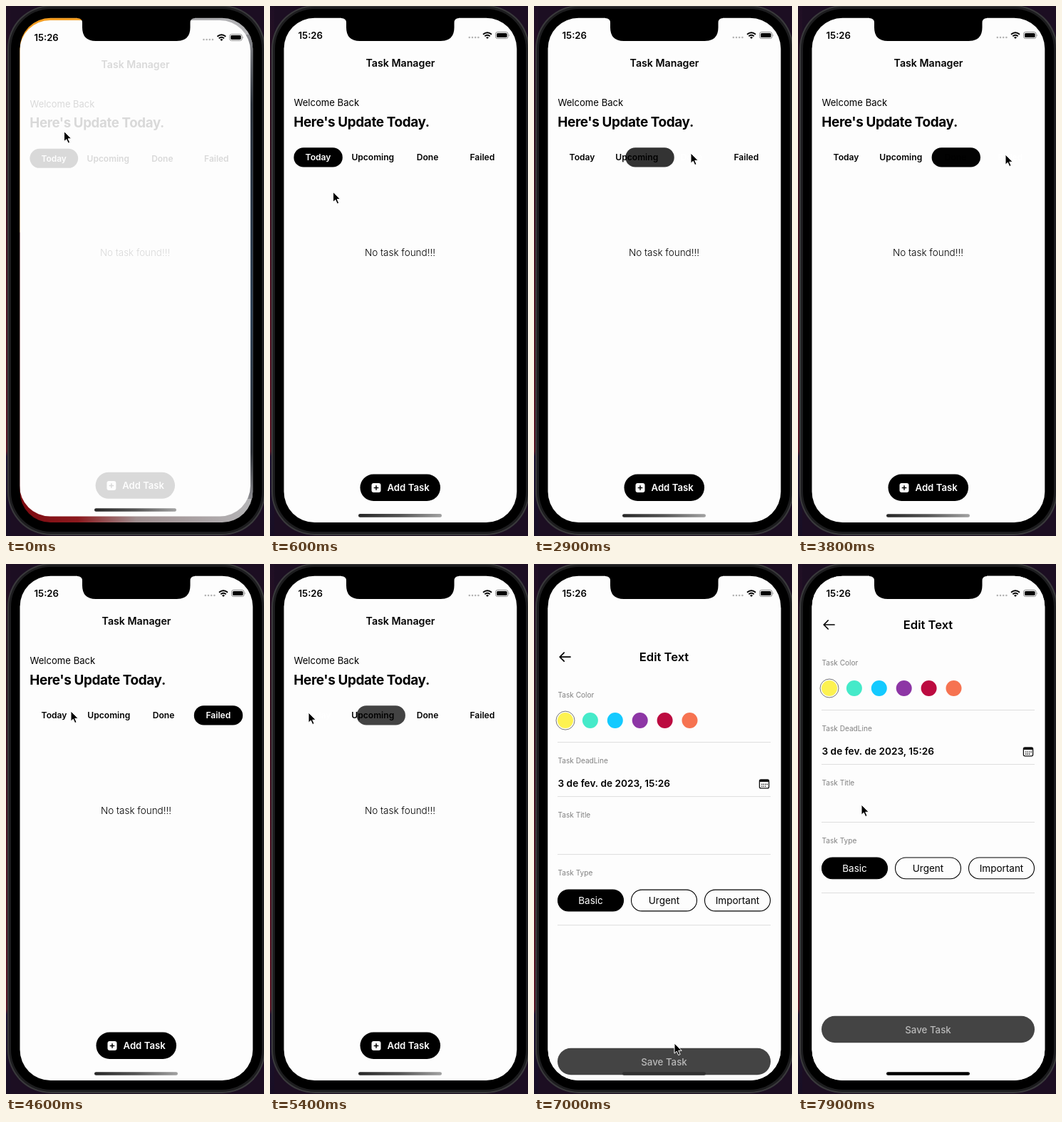
An HTML page for the animation above (8 s loop, 362x742 px).

```html
<!DOCTYPE html>
<html lang="en">
<head>
<meta charset="utf-8">
<title>Task app</title>
<style>
  html, body { margin: 0; width: 100%; height: 100%; overflow: hidden; background: #1c0e22; }
  svg { display: block; width: 100%; height: 100%; }
  text { font-family: Inter, "Open Sans", sans-serif; fill: #000; }
  .mid { text-anchor: middle; }
  .semi { font-weight: 600; }
  .light { font-weight: 300; }
  .tab { font-size: 12.1px; font-weight: 600; text-anchor: middle; }
  .label { font-size: 10.1px; fill: #808080; }
  .type { font-size: 13.5px; text-anchor: middle; }
  .line { stroke: #dedede; stroke-width: 1; }
</style>
</head>
<body>
<svg viewBox="0 0 362 742" preserveAspectRatio="xMidYMid meet">
  <defs>
    <linearGradient id="side" x2="0" y2="1">
      <stop offset="0" stop-color="#1f0f25"/>
      <stop offset=".2" stop-color="#2c101f"/>
      <stop offset=".55" stop-color="#4c1424"/>
      <stop offset=".84" stop-color="#581625"/>
      <stop offset=".85" stop-color="#1d1230"/>
      <stop offset="1" stop-color="#180e24"/>
    </linearGradient>
    <linearGradient id="wallTop">
      <stop offset="0" stop-color="#f39a1b"/>
      <stop offset=".3" stop-color="#f5a22a"/>
      <stop offset=".6" stop-color="#a5a5a8"/>
      <stop offset="1" stop-color="#b5b5b8"/>
    </linearGradient>
    <linearGradient id="wallLow">
      <stop offset="0" stop-color="#7d0a10"/>
      <stop offset=".25" stop-color="#8c1a1e"/>
      <stop offset=".5" stop-color="#a08f90"/>
      <stop offset="1" stop-color="#b4b4b6"/>
    </linearGradient>
    <linearGradient id="wallRight" x2="0" y2="1">
      <stop offset="0" stop-color="#8c8c90"/>
      <stop offset=".15" stop-color="#2c333d"/>
      <stop offset=".6" stop-color="#2f4257"/>
      <stop offset=".9" stop-color="#30343b"/>
      <stop offset="1" stop-color="#8c8c90"/>
    </linearGradient>
    <linearGradient id="barFade">
      <stop offset="0" stop-color="#262626"/>
      <stop offset=".5" stop-color="#555"/>
      <stop offset="1" stop-color="#a2a2a2"/>
    </linearGradient>
    <clipPath id="screen"><rect x="19.5" y="16.7" width="326.8" height="706.3" rx="43"/></clipPath>
    <clipPath id="winClip"><rect id="winShape" rx="43"/></clipPath>
  </defs>

  <!-- desktop and phone body -->
  <rect width="362" height="742" fill="#1c0e22"/>
  <rect width="6" height="742" fill="url(#side)"/>
  <rect x="2" y="-1" width="362" height="742" rx="61" fill="#3a3a3c"/>
  <rect x="4" y="1" width="358" height="738" rx="59" fill="#1d1d1f"/>
  <rect x="7" y="4" width="352" height="732" rx="56" fill="#000"/>

  <g clip-path="url(#screen)">
    <g id="wall">
      <rect x="19" y="16" width="328" height="301" fill="url(#wallTop)"/>
      <rect x="19" y="317" width="328" height="407" fill="url(#wallLow)"/>
      <rect x="337" y="40" width="10" height="650" fill="url(#wallRight)"/>
    </g>
    <g clip-path="url(#winClip)">
      <rect x="19" y="16" width="328" height="708" fill="#fdfdfd"/>
      <g id="zoom">
        <g id="home">
          <text class="mid semi" x="183" y="84.5" font-size="14.2">Task Manager</text>
          <text x="33.5" y="139.8" font-size="13.1">Welcome Back</text>
          <text x="33.3" y="168.5" font-size="18.9" font-weight="700" letter-spacing="-.02em">Here's Update Today.</text>
          <rect id="pill" y="198.2" width="68.4" height="27.4" rx="13.7"/>
          <g id="tabs"></g>
          <text class="mid light" x="182.5" y="350.2" font-size="13.5">No task found!!!</text>
          <rect x="126.5" y="655.5" width="112.5" height="37.5" rx="18.75"/>
          <rect x="142.5" y="668" width="13" height="13" rx="3" fill="#fff"/>
          <path d="M149 671.2v6.6M145.7 674.5h6.6" stroke="#000" stroke-width="1.5"/>
          <text x="164.5" y="679.3" font-size="13.2" font-weight="600" style="fill:#fff">Add Task</text>
        </g>
      </g>

      <g id="page">
        <rect x="19" y="16" width="328" height="760" fill="#fdfdfd"/>
        <path d="M51 85H36.2M42.2 79l-6 6 6 6" fill="none" stroke="#000" stroke-width="1.7" stroke-linecap="round" stroke-linejoin="round"/>
        <text class="mid semi" x="182.5" y="90.9" font-size="16.6">Edit Text</text>
        <text class="label" x="33.5" y="141.8">Task Color</text>
        <g id="swatches"></g>
        <text class="label" x="33.5" y="233.7">Task DeadLine</text>
        <text class="semi" x="33.5" y="266.8" font-size="13.65">3 de fev. de 2023, 15:26</text>
        <g fill="none" stroke="#111" stroke-width="1.3">
          <rect x="316.4" y="256.8" width="13.2" height="12" rx="2"/>
          <path d="M316.4 258.5h13.2" stroke-width="3"/>
          <path d="M319 263.2h9M319 266h7" stroke-dasharray="1.4 1.1"/>
        </g>
        <text class="label" x="33.5" y="309.8">Task Title</text>
        <text class="label" x="33.5" y="390.6">Task Type</text>
        <path class="line" d="M33 204.5H332M33 280.5H332M33 361.5H332M33 460.5H332"/>
        <g id="types"></g>
        <rect x="33" y="632.7" width="299" height="37.5" rx="18.75" fill="#444"/>
        <text class="mid" x="182.5" y="656.6" font-size="13.3" font-weight="500" style="fill:#b9b9b9">Save Task</text>
      </g>

      <g id="status">
        <text class="semi" x="39.5" y="45.6" font-size="13.2">15:26</text>
        <path d="M279.8 44h14" stroke="#b4b4b4" stroke-width="2.6" stroke-linecap="round" stroke-dasharray="0 4.2"/>
        <path d="M299 39.8Q305 34.6 311 39.8M301.3 42.3Q305 39.1 308.7 42.3" fill="none" stroke="#000" stroke-width="1.9"/>
        <path d="M303 43.9Q305 42.3 307 43.9L305 46Z"/>
        <rect x="316.5" y="36.5" width="17.6" height="9" rx="2.7" fill="none" stroke="#8a8a8a"/>
        <rect x="318" y="38" width="14.6" height="6" rx="1.5"/>
        <path d="M335.3 39.4q1.6 1.6 0 3.2z" fill="#8a8a8a"/>
      </g>
      <rect id="bar" x="124" height="4.6" rx="2.3"/>
    </g>
  </g>

  <path d="M100 16H265V17Q258.500 17 258.500 23.500V30Q258.500 49 239.500 49H126Q107 49 107 30V23.500Q107 17 100 17Z"/>
  <path id="cursor" d="M0 0V14.200L3.300 11.200L5.700 16.600L8.100 15.500L5.700 10.300H10.200Z" stroke="#fff" stroke-width="1" stroke-linejoin="round"/>
</svg>

<script>
const LOOP = 8000, STEP = 100;
const $ = id => document.getElementById(id);
const clamp = v => Math.max(0, Math.min(1, v));
const lerp = (a, b, p) => a + (b - a) * p;
const ease = p => p * p * (3 - 2 * p);
const set = (el, attrs) => { for (const k in attrs) el.setAttribute(k, attrs[k]); };

function add(parent, tag, attrs, text) {
  const el = document.createElementNS("http://www.w3.org/2000/svg", tag);
  set(el, attrs);
  if (text) el.textContent = text;
  $(parent).appendChild(el);
  return el;
}

const tabX = i => 33.4 + 76.8 * i;
const tabs = ["Today", "Upcoming", "Done", "Failed"].map((name, i) =>
  add("tabs", "text", { class: "tab", x: tabX(i) + 34.1, y: 216.4 }, name));

["#fdf251", "#45eac9", "#14caff", "#8d36a5", "#bc0b40", "#f67351"].forEach((fill, i) =>
  add("swatches", "circle", { cx: 44 + 34.9 * i, cy: 174, r: 11, fill }));
add("swatches", "circle", { cx: 44, cy: 174, r: 13, fill: "none", stroke: "#777" });

["Basic", "Urgent", "Important"].forEach((name, i) => {
  const x = 33.5 + 103 * i;
  add("types", "rect", { x, y: 411, width: 92, height: 29.8, rx: 14.9,
    fill: i ? "none" : "#000", stroke: "#000", "stroke-width": 1.1 });
  add("types", "text", { class: "type", x: x + 46, y: 430.7, style: i ? "" : "fill:#fff" }, name);
});

// tab taps: time, tab index
const taps = [[-1000, 0], [1890, 1], [2780, 2], [3780, 3], [5180, 0]];

// pointer stops: time, x, y
const stops = [
  [0, 81.5, 175.5], [900, 91, 290], [1150, 116, 385], [1450, 134, 285], [1700, 156, 217],
  [2250, 156, 217], [2700, 220, 206], [3350, 220, 206], [3750, 291, 208],
  [4250, 291, 208], [4600, 91, 206], [4800, 54, 208], [5600, 54, 208],
  [6300, 197, 671], [7050, 197, 671], [7500, 214, 215], [7650, 150, 190],
  [7800, 60, 345], [7900, 89, 337], [8000, 89, 337]
];

function pointer(t) {
  const i = stops.findIndex(s => s[0] > t);
  const a = stops[i - 1], b = stops[i];
  const p = ease((t - a[0]) / (b[0] - a[0]));
  return [lerp(a[1], b[1], p), lerp(a[2], b[2], p)];
}

function drawWindow(t) {
  const r = t < 900 ? Math.exp(-t / 130) : 0;
  const top = 16 + 4 * r, bottom = 724 - 9.5 * r;
  const zoom = `translate(${0.35 * r} ${3.4 * r}) scale(${1 - 0.0097 * r} ${1 - 0.0095 * r})`;
  set($("wall"), { visibility: r > 0.01 ? "visible" : "hidden" });
  set($("winShape"), { x: 19, y: top, width: 328 - 4 * r, height: bottom - top });
  set($("zoom"), { transform: zoom });
  set($("status"), { transform: zoom });
  set($("home"), { opacity: clamp(0.14 + t / 310) });
  set($("bar"), {
    y: 711.2 - 8 * r, width: 117 - 2 * r,
    fill: t < 6700 ? "url(#barFade)" : t < 7300 ? "#303030" : "#000"
  });
}

function drawTabs(t) {
  const n = taps.filter(s => s[0] <= t).length - 1;
  const [start, now] = taps[n];
  const from = n ? taps[n - 1][1] : 0;
  const p = ease(clamp((t - start) / 380));
  set($("pill"), { x: lerp(tabX(from), tabX(now), p), opacity: 1 - 1.13 * p * (1 - p) });
  tabs.forEach((el, i) => { el.style.fill = i === now ? "#fff" : "#000"; });
}

function drawPage(t) {
  const shown = t >= 6700;
  const w = Math.max(0, (t - 6620) * 0.0117);
  const y = t >= 7500 ? 0 : 706 * (1 + w) * Math.exp(-w);
  set($("page"), { transform: `translate(0 ${y})`, visibility: shown ? "visible" : "hidden" });
}

function draw(now) {
  const t = Math.floor((now % LOOP) / STEP) * STEP;
  drawWindow(t);
  drawTabs(t);
  drawPage(t);
  set($("cursor"), { transform: `translate(${pointer(t).join(" ")})` });
}

function tick() {
  draw(performance.now());
  requestAnimationFrame(tick);
}
tick();
</script>
</body>
</html>
```
